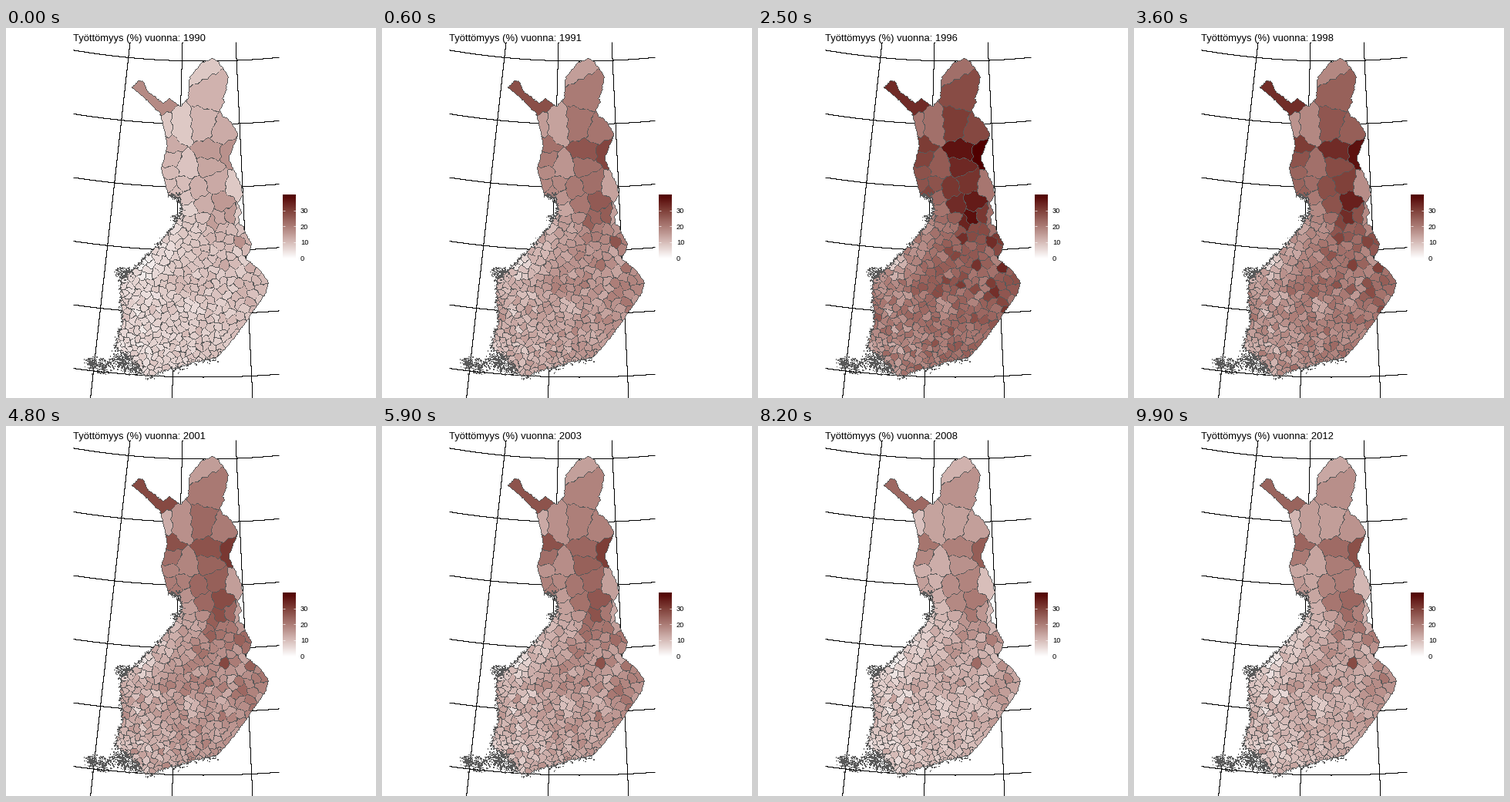
A matplotlib script that plays this animation: 480x480 px, repeating every 10 s.

```python
import numpy as np
import matplotlib.pyplot as plt
from matplotlib.animation import FuncAnimation
from matplotlib.colors import LinearSegmentedColormap
from matplotlib.path import Path

SIZE, PX = 480, 0.75  # stage in pixels, points per pixel at 96 dpi
FRAMES, STEP = 100, 100
YEARS = np.arange(1990, 2013)
TOP = 40.4
EDGE = np.array([89, 89, 89, 255]) / 255
rng = np.random.default_rng(11)

shades = [(255, 255, 255), (215, 189, 185), (172, 125, 119), (128, 65, 58), (80, 0, 0)]
cmap = LinearSegmentedColormap.from_list("rate", np.array(shades) / 255)

# ---------- land ----------
land = [(275, 427), (297, 402), (318, 372), (337, 345), (341, 330), (330, 314),
        (310, 298), (316, 292), (319, 280), (309, 262), (309, 257), (303, 254),
        (302, 244), (306, 240), (301, 227), (308, 216), (305, 204), (289, 169),
        (302, 138), (290, 119), (281, 114), (278, 106), (284, 96), (281, 91),
        (285, 85), (289, 62), (275, 43), (268, 39), (252, 46), (238, 65),
        (236, 91), (226, 101), (212, 91), (204, 97), (184, 82), (178, 69),
        (172, 68), (163, 77), (174, 86), (200, 111), (209, 152), (201, 182),
        (210, 217)]
sea = [(210, 217), (225, 222), (228, 238), (214, 261), (190, 288), (164, 313),
       (148, 326), (149, 366), (151, 381), (141, 413), (167, 436), (173, 448),
       (184, 453), (208, 445), (250, 433), (275, 427)]


def rough(pts, wobble):
    """Walk along pts in short steps with a seeded wobble."""
    pts = np.array(pts, float)
    run = np.r_[0, np.cumsum(np.hypot(*np.diff(pts, axis=0).T))]
    s = np.arange(0, run[-1], 1.5)
    line = np.column_stack([np.interp(s, run, pts[:, k]) for k in (0, 1)])
    return line + rng.normal(0, wobble, line.shape)


coast = rough(sea, 0.9)
outline = Path(np.vstack([rough(land, 0.4), coast]))

# ---------- regions ----------
# Northern regions: x, y, rate relative to the typical one
north = [(250, 50, 1.15), (266, 82, 1.5), (195, 95, 2.1), (226, 130, 1.15),
         (256, 128, 1.4), (280, 136, 1.65), (291, 160, 2.1), (265, 160, 1.85),
         (263, 179, 1.75), (235, 182, 1.2), (205, 131, 1.2), (209, 152, 1.6),
         (211, 172, 1.5), (212, 188, 1.4), (212, 204, 1.25), (222, 213, 1.4),
         (229, 204, 1.3), (230, 219, 1.2), (248, 208, 1.55), (273, 201, 1.65),
         (297, 206, 1.2), (257, 230, 1.6), (280, 225, 1.85), (292, 245, 2.0),
         (237, 239, 1.0), (268, 254, 1.8), (303, 279, 2.0), (283, 306, 1.7),
         (318, 312, 1.6), (331, 340, 1.4)]


def southern_seeds():
    """Points in the south, closer together towards the south-west."""
    seeds = [np.array(p[:2], float) for p in north]
    for p in rng.uniform((138, 245), (342, 456), (7000, 2)):
        t = np.clip((p[0] - 150 + 430 - p[1]) / 300, 0, 1.1)
        gap = (4.8 + 5 * t) * rng.uniform(0.85, 1.4)
        if (np.hypot(*(np.array(seeds) - p).T).min() > gap
                and outline.contains_point(p)):
            seeds.append(p)
    return np.array(seeds)


def south_factor(x, y):
    def hill(cx, cy, size):
        return np.exp(-((x - cx) ** 2 + (y - cy) ** 2) / (2 * size ** 2))

    base = 0.78 + 0.45 * (x - 150) / 150 + rng.normal(0, 0.15, len(x))
    bumps = (0.3 * hill(225, 335, 17) + 0.25 * hill(160, 370, 12)
             + 0.3 * hill(270, 268, 25) - 0.45 * hill(178, 306, 15))
    return np.clip(base + bumps, 0.3, 1.9)


seeds = southern_seeds()
factor = np.r_[[p[2] for p in north], south_factor(*seeds[len(north):].T)]

# Yearly states: gaps between regions narrow when the rate is high
knots = {1990: 7.3, 1991: 11, 1992: 18.3, 1993: 22, 1994: 22.5, 1996: 20.3,
         2001: 13.6, 2004: 12.9, 2008: 9.5, 2009: 11.3, 2011: 10.5, 2012: 11.2}
typical = np.interp(YEARS, list(knots), list(knots.values()))[:, None]
drift = np.cumsum(rng.normal(0, 0.03, (len(YEARS), len(seeds))), axis=0)
states = typical * factor ** (1.35 - 0.025 * typical) * np.exp(drift)


# ---------- map raster ----------
def warp(x, y):
    return (x + 1.1 * np.sin(0.42 * y + 0.15 * x) + 0.4 * np.sin(0.9 * y - 0.5 * x),
            y + 1.1 * np.sin(0.45 * x - 0.12 * y + 2) + 0.4 * np.sin(0.9 * x + 0.6 * y))


def build_map():
    """Region number per land pixel, and the mask of border pixels."""
    gy, gx = np.mgrid[:SIZE, :SIZE] + 0.5
    inside = outline.contains_points(np.c_[gx.ravel(), gy.ravel()])
    inside = inside.reshape(SIZE, SIZE)
    p = np.column_stack(warp(gx[inside], gy[inside]))
    d = ((p[:, None] - seeds) ** 2).sum(2)
    rows = np.arange(len(p))
    first, second = np.argpartition(d, 1, axis=1)[:, :2].T
    swap = d[rows, first] > d[rows, second]
    first, second = np.where(swap, second, first), np.where(swap, first, second)
    # A pixel is border when the bisector passes through it
    reach = np.abs(seeds[first] - seeds[second]).max(1)
    label = np.full((SIZE, SIZE), -1)
    label[inside] = first
    edge = np.zeros((SIZE, SIZE), bool)
    edge[inside] = d[rows, second] - d[rows, first] < reach
    for shift, axis in [(1, 0), (-1, 0), (1, 1), (-1, 1)]:
        edge |= inside & ~np.roll(inside, shift, axis)
    return label, edge


def add_islets(edge, pts):
    for x, y in pts.astype(int):
        w, h = rng.integers(1, 3, 2)
        edge[y:y + h, x:x + w] = True


label, edge = build_map()
pick = coast[rng.integers(0, len(coast), 420)]
spread = np.where(pick[:, 1] > 415, 2.2, 1.0)[:, None]
add_islets(edge, pick + rng.normal(0, 1, pick.shape) * spread)

# Archipelagos: centre and spread
for x, y, sx, sy in [(111, 434, 5, 4), (125, 438, 7, 5), (150, 432, 8, 5),
                     (163, 442, 7, 4), (152, 318, 6, 4), (217, 217, 4, 2),
                     (221, 246, 4, 2)]:
    offs = np.clip(rng.normal(0, 1, (int(5 * sx * sy), 2)), -2, 2)
    add_islets(edge, offs * (sx, sy) + (x, y))

# ---------- stage ----------
plt.rcParams["font.family"] = "Liberation Sans"
fig = plt.figure(figsize=(5, 5), dpi=96, facecolor="white")
ax = fig.add_axes([0, 0, 1, 1])
ax.axis("off")


def stairs(run, across):
    """Pixel steps along run for a crisp one pixel line."""
    a = np.column_stack([run, run + 1]).ravel()
    return a, np.repeat(np.floor(across) + 0.5, 2)


def line(x, y):
    ax.plot(x, y, color="black", lw=PX, snap=True, solid_capstyle="butt")


gx, gy = np.arange(87, 354), np.arange(18, SIZE)
for i in range(6):
    line(*stairs(gx, 42 + 82 * i - (0.0005 - 0.00002 * i) * (gx - 255) ** 2))
for x0, x1 in [(160, 108.5), (228, 214.5), (297, 319)]:
    y, x = stairs(gy, x0 + (x1 - x0) * (gy - 18) / 462)
    line(x, y)

shape = ax.imshow(np.zeros((SIZE, SIZE, 4)), extent=(0, SIZE, SIZE, 0),
                  interpolation="nearest", zorder=3)

# Legend
Y0, Y1 = 299, 216
ax.imshow(np.linspace(1, 0, 256)[:, None], cmap=cmap, extent=(359, 376, Y0, Y1),
          aspect="auto", zorder=3)
for rate in (0, 10, 20, 30):
    y = Y0 - 0.5 - rate * (Y0 - Y1) / TOP
    for x in (359, 372.6):
        ax.plot([x, x + 3.4], [y, y], color="white", lw=0.5, zorder=4,
                solid_capstyle="butt")
    ax.text(382, y, str(rate), fontsize=9.2 * PX, va="center_baseline")

title = ax.text(87, 17, "", fontsize=13 * PX, va="baseline")
ax.set(xlim=(0, SIZE), ylim=(SIZE, 0))


def draw(i):
    t = (len(YEARS) - 1) * i / (FRAMES - 1)
    k = min(int(t), len(YEARS) - 2)
    rates = states[k] + (states[k + 1] - states[k]) * (t - k)
    fills = cmap(np.clip(rates / TOP, 0, 1))
    # The extra last row is the clear sea, reached by label -1
    img = np.vstack([fills, np.zeros(4)])[label]
    img[edge] = EDGE
    shape.set_data(img)
    title.set_text(f"Työttömyys (%) vuonna: {round(YEARS[0] + t)}")
    return shape, title


anim = FuncAnimation(fig, draw, frames=FRAMES, interval=STEP, repeat=True, blit=False)
plt.show()
```
